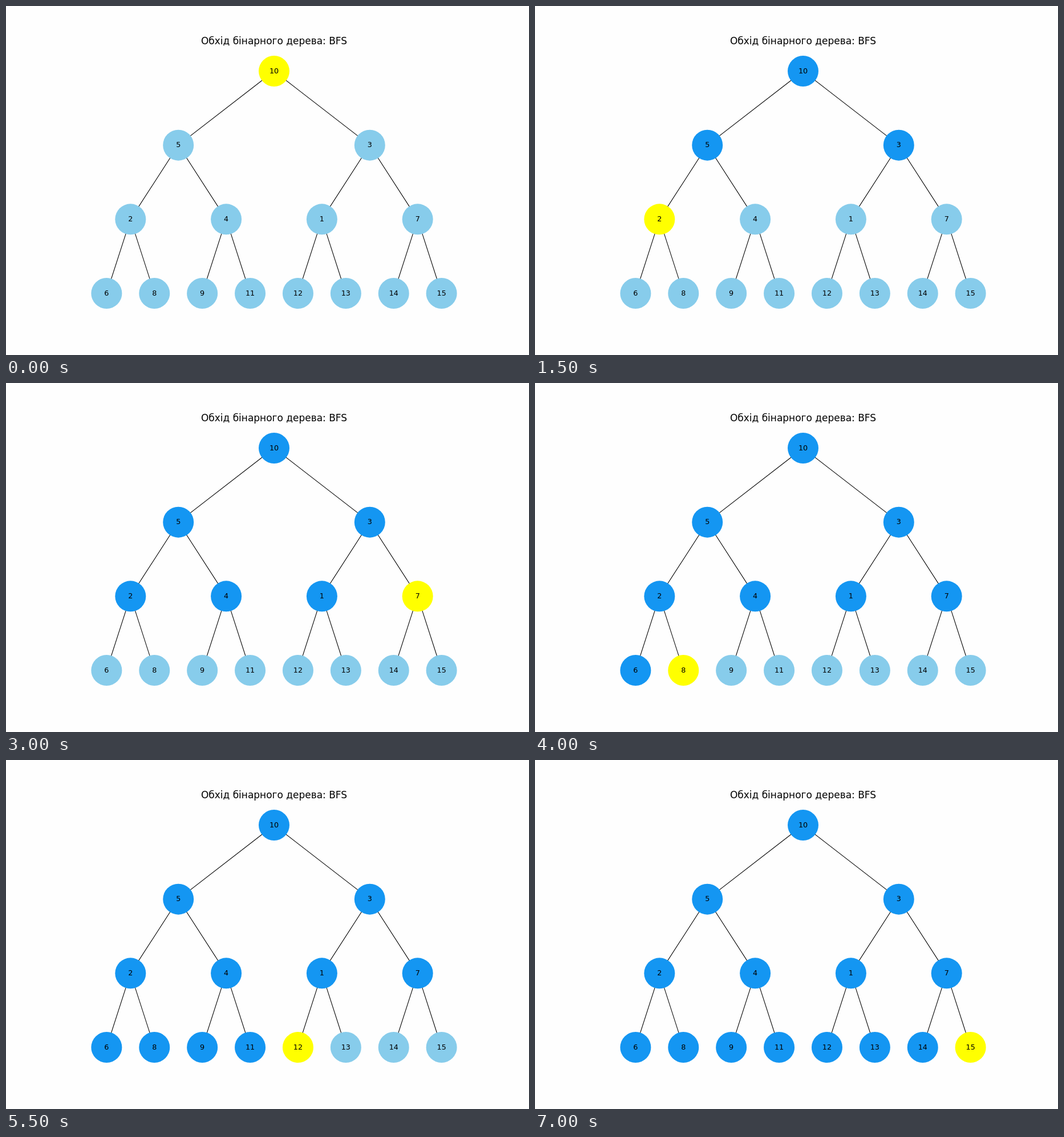
Animation, 917 px wide and 611 px high, one loop 7500 ms. Source, as an HTML page:

```html
<!DOCTYPE html>
<html lang="uk">
<head>
<meta charset="utf-8">
<style>
  html, body { margin: 0; width: 100%; height: 100%; overflow: hidden; background: #fefefe; }
  svg { display: block; }
  text { font: 12.73px "DejaVu Sans", sans-serif; text-anchor: middle; }
  .title { font-size: 16.98px; }
  line { stroke: #000; stroke-width: 1.06; }
</style>
</head>
<body>
<svg width="917" height="611" viewBox="0 0 917 611">
  <g id="edges"></g>
  <g id="nodes"></g>
  <text class="title" x="470" y="67">Обхід бінарного дерева: BFS</text>
</svg>
<script>
const STEP = 500;
const IDLE = '#87cceb', ACTIVE = '#ffff00', VISITED = '#1496f2';
// Tree values in breadth-first order
const values = [10, 5, 3, 2, 4, 1, 7, 6, 8, 9, 11, 12, 13, 14, 15];

function place(i) {
  const level = Math.floor(Math.log2(i + 1));
  const count = 2 ** level;
  const slot = i + 1 - count;
  return { x: 470 + 671.2 * ((slot + 0.5) / count - 0.5), y: 114 + 129.67 * level };
}

function add(parent, tag, attrs, text = '') {
  const el = document.createElementNS('http://www.w3.org/2000/svg', tag);
  for (const key in attrs) el.setAttribute(key, attrs[key]);
  el.textContent = text;
  return parent.appendChild(el);
}

const edges = document.getElementById('edges');
const nodes = document.getElementById('nodes');

const circles = values.map((value, i) => {
  const { x, y } = place(i);
  if (i) {
    const up = place((i - 1) >> 1);
    add(edges, 'line', { x1: up.x, y1: up.y, x2: x, y2: y });
  }
  const circle = add(nodes, 'circle', { cx: x, cy: y, r: 27 });
  add(nodes, 'text', { x, y: y + 3.6 }, value);
  return circle;
});

function draw() {
  const current = Math.floor(performance.now() / STEP) % values.length;
  circles.forEach((circle, i) => {
    circle.setAttribute('fill', i < current ? VISITED : i === current ? ACTIVE : IDLE);
  });
  requestAnimationFrame(draw);
}
draw();
</script>
</body>
</html>
```
